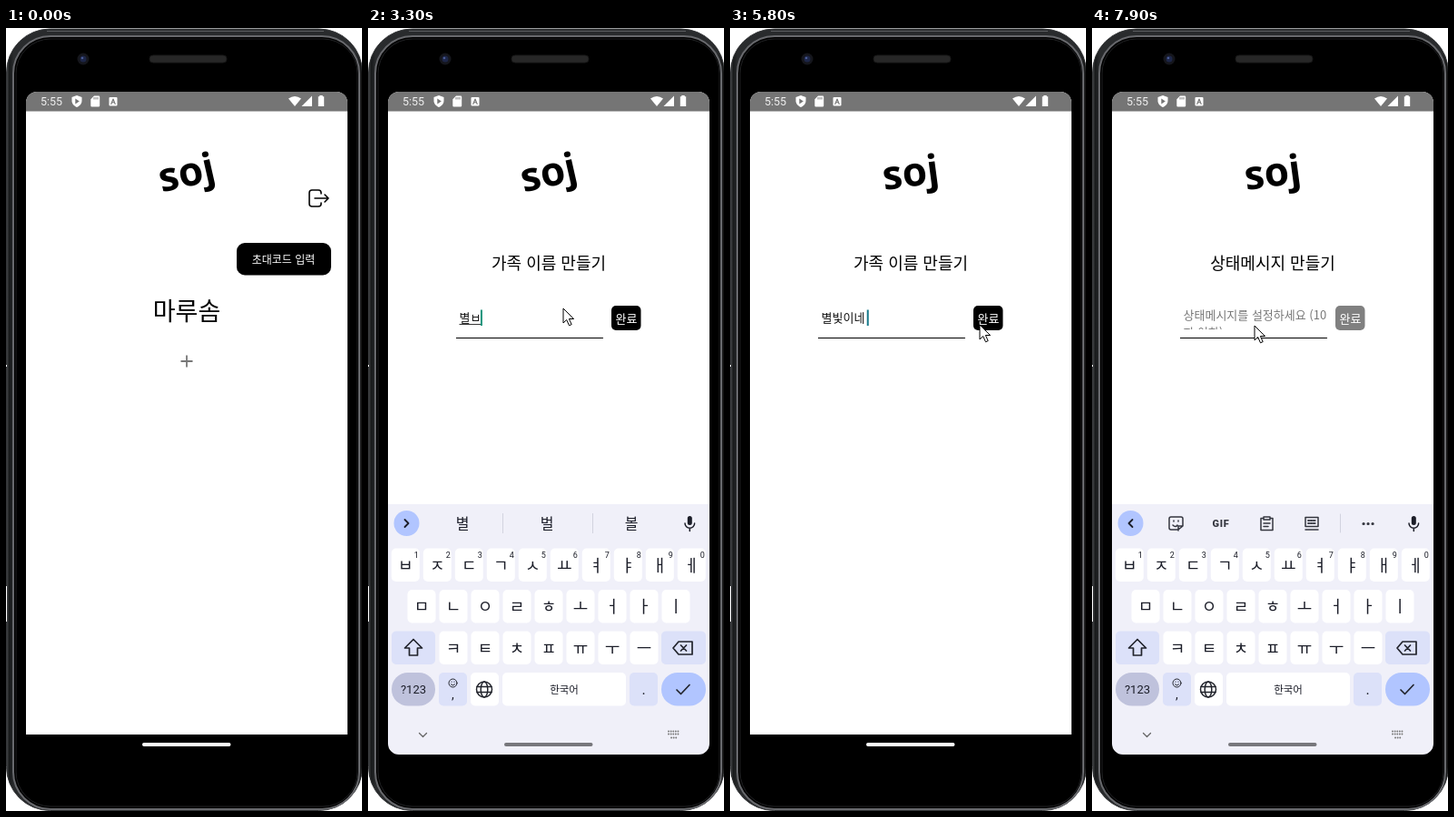
An HTML page that plays this animation: 392 by 860 pixels, repeating every 8000 ms.

```html
<!DOCTYPE html>
<html lang="ko">
<head>
<meta charset="utf-8">
<title>Family setup</title>
<style>
  html, body { margin: 0; width: 100%; height: 100%; overflow: hidden; background: #fff; }
  svg { display: block; width: 100%; height: 100%; }
  text { font-family: "Noto Sans CJK KR", "Noto Sans CJK", "Noto Sans CJK JP", sans-serif; white-space: pre; }
  .mid { text-anchor: middle; }
  .title { font-size: 18px; font-weight: 500; }
  .field { font-size: 13px; font-weight: 350; }
  .latin { font-family: Roboto, sans-serif; }
  .line { fill: none; stroke-linecap: round; stroke-linejoin: round; }
</style>
</head>
<body>
<svg viewBox="0 0 392 860" preserveAspectRatio="none">
  <defs>
    <clipPath id="screenClip"><path d="M22 798V82a12 12 0 0 1 12-12H364a12 12 0 0 1 12 12V786a12 12 0 0 1-12 12H34a12 12 0 0 1-12-12z"/></clipPath>
    <clipPath id="fieldClip"><rect x="97" y="305" width="162" height="26"/></clipPath>
    <linearGradient id="rim">
      <stop offset="0" stop-color="#4a4c4f"/><stop offset=".008" stop-color="#17191a"/>
      <stop offset=".02" stop-color="#292b2d"/><stop offset=".98" stop-color="#292b2d"/><stop offset="1" stop-color="#111"/>
    </linearGradient>
  </defs>

  <!-- phone body -->
  <rect x=".5" y="1" width="392" height="858.5" rx="48" fill="url(#rim)" stroke="#333537"/>
  <rect x="8" y="9" width="381" height="849" rx="41" fill="#000" stroke="#68696d" stroke-width="2"/>
  <rect x="11" y="12" width="376" height="843" rx="38" fill="#000" stroke="#202123"/>
  <path d="M45 3.5H350" stroke="#5b5d60"/>
  <path d="M0 613h1v39h-1zM0 370h1v2h-1z" fill="#fff"/>
  <circle cx="85" cy="34" r="6.5" fill="#15161c"/>
  <circle cx="85" cy="34" r="3.5" fill="#1d2648"/>
  <circle cx="84" cy="33" r="1.3" fill="#4a5a94"/>
  <rect x="158" y="30" width="85" height="8" rx="4" fill="#272727" stroke="#1a1a1a"/>

  <g clip-path="url(#screenClip)">
    <rect x="22" y="70" width="354" height="706" fill="#fff"/>
    <rect x="22" y="70" width="354" height="21.5" fill="#757575"/>
    <g fill="#fff">
      <text class="latin" x="38" y="85.3" font-size="12.5" fill="#f0f0f0">5:55</text>
      <path d="M78 74l5.5 2v4c0 3.500-2.500 5.500-5.500 7c-3-1.500-5.500-3.500-5.500-7v-4z"/>
      <path d="M76.300 77.500v6l4.500-3z" fill="#757575"/>
      <path d="M97 74.500h5a1.200 1.200 0 0 1 1.200 1.200v9.600a1.200 1.200 0 0 1-1.200 1.200h-7.500a1.200 1.200 0 0 1-1.200-1.200v-7z"/>
      <path d="M97 76v2.500m2-2.500v2.500m2-2.500v2.500" stroke="#757575" stroke-width=".9"/>
      <rect x="113.500" y="76" width="9" height="9.500" rx="1"/>
      <path d="M115.800 83.500l2.200-5.500 2.200 5.500m-3.700-1.800h3" stroke="#757575" stroke-width="1.100" class="line"/>
      <path d="M311 77.500q7-5 14 0l-7 8.500z"/>
      <path d="M337 74.500v11.500h-11.500z"/>
      <path d="M345.300 74h3.400v1.300h1.500v10.700h-6.400v-10.700h1.500z"/>
    </g>

    <text id="brand" class="mid" x="199" y="174" font-size="44" font-weight="700" style="font-family:'Noto Sans',sans-serif">soj</text>

    <g id="home">
      <path class="line" stroke="#000" stroke-width="1.600" d="M347 182v-1a3 3 0 0 0-3-3h-7a3 3 0 0 0-3 3v12a3 3 0 0 0 3 3h7a3 3 0 0 0 3-3v-1M340 187h15m-4-4l4 4-4 4"/>
      <rect x="254" y="236" width="104" height="35.500" rx="9"/>
      <text class="mid" x="305.500" y="258.500" font-size="12" fill="#fff">초대코드 입력</text>
      <text class="mid" x="199" y="321" font-size="27" font-weight="500">마루솜</text>
      <path d="M192.500 366h13m-6.500-6.500v13" stroke="#777" stroke-width="1.800"/>
    </g>

    <g id="form">
      <text id="title" class="mid title" x="199" y="265"></text>
      <g clip-path="url(#fieldClip)">
        <text id="entry" class="field" x="100.500" y="323"></text>
        <text id="entryRest" class="field" x="100.500" y="339" fill="#777">자 이하)</text>
      </g>
      <path id="composing" stroke="#222" stroke-width=".9"/>
      <rect id="caret" y="309.500" width="2" height="17.500" fill="#187a8c"/>
      <path d="M97 340.500H259" stroke="#000" stroke-width="1.200"/>
      <rect id="done" x="268" y="305" width="32.500" height="27" rx="5"/>
      <text class="mid" x="284.500" y="324" font-size="13" font-weight="500" fill="#fff">완료</text>
    </g>

    <g id="keyboard">
      <rect x="22" y="523" width="354" height="275" fill="#f0f0f9"/>
      <circle cx="42.500" cy="544" r="14" fill="#b1c5ff"/>
      <path id="chevron" class="line" stroke="#1b1d28" stroke-width="1.800"/>
      <g id="tools" class="line" stroke="#34363f" stroke-width="1.500">
        <path d="M100 547v-8a2 2 0 0 0-2-2h-11a2 2 0 0 0-2 2v10a2 2 0 0 0 2 2h8zM95 552v-5h5M89 546q3 3 5 0M90 541v1m5-1v1"/>
        <text class="latin mid" x="142" y="548" font-size="11" font-weight="900" fill="#34363f" stroke="none" letter-spacing=".8">GIF</text>
        <path d="M189 538.500h-3v13h13v-13h-3M189 537h7v3h-7zM189 544h7m-7 3.500h5"/>
        <path d="M235 537.500h14v10h-14zM238 541h8m-8 3h8M235 551h14" /><path d="M238 541h8m-8 3h8" stroke-dasharray="1 2"/>
        <path d="M273.500 534v20" stroke="#d2d3df" stroke-width="1"/>
        <path d="M299 544.500h.1m4.900 0h.1m4.900 0h.1" stroke-width="3.200"/>
      </g>
      <g id="hints">
        <path d="M148.500 533v22M247.500 533v22" stroke="#d2d3df"/>
      </g>
      <rect x="351.800" y="536" width="5" height="10" rx="2.500" fill="#1b1d28"/>
      <path class="line" stroke="#1b1d28" stroke-width="1.500" d="M349 544a5.300 5.300 0 0 0 10.600 0M354.300 549.500v3"/>
      <g id="keys"></g>
      <g class="line" stroke="#22242c" stroke-width="1.700">
        <path d="M50 671.500l-9.500 9.500h5v8h9v-8h5z"/>
        <path d="M342 674h15v14h-15l-6-7zM344.500 678l6 6m0-6l-6 6"/>
        <g stroke-width="1.500"><circle cx="128" cy="726.500" r="8.500"/><ellipse cx="128" cy="726.500" rx="3.800" ry="8.500"/><path d="M120 723.500h16m-16 6h16"/></g>
        <g stroke-width="1"><circle cx="93.500" cy="719.500" r="4.500"/><path d="M91.500 721q2 2 4 0M92 718v.2m3-.2v.2"/></g>
        <path d="M340 727l4.500 4.500 9.500-10"/>
        <path d="M56.500 774.500l4 4 4-4" stroke="#666" stroke-width="1.300"/>
        <path d="M331 772.500h13m-13 3h13m-10 4h7" stroke="#777" stroke-width="1.800" stroke-dasharray=".1 2.500"/>
      </g>
    </g>
  </g>
  <rect id="pill" x="150" y="785" width="97.500" height="4" rx="2"/>
  <path id="pointer" d="M0 0v16l3.700-3.500 2.800 6.300 2.700-1.200-2.800-6.100h5.200z" fill="#fff" stroke="#000" stroke-width="1"/>
</svg>
<script>
const LOOP = 8000, FORM_AT = 1200, STATUS_AT = 6100;
const FOCUS = [1900, 7100];
const SWING = 800, MAX_TILT = 15;
const LETTER = 11.96;

const $ = id => document.getElementById(id);
const show = (id, on) => $(id).setAttribute('display', on ? 'inline' : 'none');
const set = (id, attrs) => { for (const k in attrs) $(id).setAttribute(k, attrs[k]); };
const clamp = v => Math.min(1, Math.max(0, v));
const smooth = v => v * v * (3 - 2 * v);
const easeOut = v => 1 - (1 - v) ** 2;

const typed = [
  [2800, 'ㅂ'], [2950, '벼'], [3100, '별'], [3250, '별ㅂ'], [3400, '별비'], [3550, '별빛'],
  [3700, '별빛ㅇ'], [3850, '별빛이'], [4000, '별빛인'], [4150, '별빛이네'], [4350, '별빛이네 ']
];

// time, x, y
const route = [
  [400, 310, 340], [700, 197, 364], [1250, 197, 364], [1650, 215, 308],
  [4700, 215, 308], [5200, 320, 332], [5500, 320, 332], [5750, 275, 326],
  [6200, 275, 326], [6600, 179, 327]
];

function buildKeys() {
  const key = (x, y, w, fill, rx = 5) => `<rect x="${x}" y="${y}" width="${w}" height="36.5" rx="${rx}" fill="${fill}"/>`;
  const label = (x, y, size, s, cls = '') => `<text class="mid ${cls}" x="${x}" y="${y}" font-size="${size}" fill="#1b1d28">${s}</text>`;
  let out = '';
  [['ㅂㅈㄷㄱㅅㅛㅕㅑㅐㅔ', 41.3, 571.5], ['ㅁㄴㅇㄹㅎㅗㅓㅏㅣ', 59, 617], ['ㅋㅌㅊㅍㅠㅜㅡ', 94, 662.5]].forEach(([row, x0, y], r) =>
    [...row].forEach((c, i) => {
      const x = x0 + i * 35;
      out += key(x - 15.5, y, 31, '#fff') + label(x, y + 25, 18, c);
      if (!r) out += label(x + 12, y + 10.5, 9, (i + 1) % 10, 'latin');
    }));
  const pale = '#dce1f9';
  out += key(26, 662.5, 48, pale) + key(323, 662.5, 49, pale);
  out += key(26, 708, 48, '#bfc2dc', 18) + label(50, 731, 13, '?123', 'latin');
  out += key(78, 708, 31, pale) + label(93.5, 737, 14, ',', 'latin');
  out += key(113, 708, 31, '#fff') + key(148, 708, 136, '#fff') + label(216, 730.5, 11.5, '한국어');
  out += key(288, 708, 31, pale) + label(303.5, 732, 16, '.', 'latin') + key(323, 708, 49, '#b1c5ff', 18);
  $('keys').innerHTML = out;
  $('hints').innerHTML += [104, 197, 290].map(x => label(x, 550, 16, '', 'hint')).join('');
}

function pointerAt(t) {
  const i = route.findIndex(p => p[0] > t);
  if (i < 0) return route[route.length - 1].slice(1);
  const [t0, x0, y0] = route[i - 1], [t1, x1, y1] = route[i];
  const k = smooth((t - t0) / (t1 - t0));
  return [x0 + (x1 - x0) * k, y0 + (y1 - y0) * k];
}

function keyboardLevel(t) {
  const rise = start => easeOut(clamp((t - start) / 300));
  if (t >= STATUS_AT) return rise(7120);
  return rise(1893) * (1 - smooth(clamp((t - 4450) / 260)));
}

function drawForm(t) {
  const status = t >= STATUS_AT;
  const step = status ? undefined : typed.filter(s => s[0] <= t).pop();
  const value = step ? step[1] : '';
  const composing = !!value && !value.endsWith(' ');
  const letters = value.trimEnd().length;

  $('title').textContent = status ? '상태메시지 만들기' : '가족 이름 만들기';
  $('entry').textContent = value || (status ? '상태메시지를 설정하세요 (10' : '가족 이름을 설정하세요 (8자');
  set('entry', { y: status ? 319.5 : 323, fill: value ? '#111' : '#777' });
  show('entryRest', status);
  set('done', { fill: value ? '#000' : '#808080' });

  const end = 100.5 + letters * LETTER;
  show('composing', composing);
  set('composing', { d: `M100.5 325.500H${end}` });

  const focused = FOCUS[+status];
  const since = t - (step ? step[0] : focused);
  show('caret', t >= focused && Math.floor(since / 500) % 2 === 0);
  set('caret', { x: end + (value.endsWith(' ') ? 2.9 : 0) - .5, fill: composing ? '#18947c' : '#187a8c' });

  show('tools', !value);
  show('hints', composing);
  set('chevron', { d: value ? 'M40.500 540l4 4-4 4' : 'M44.500 540l-4 4 4 4' });
  const words = t < 3500 ? ['별', '벌', '볼'] : ['별빛', '별빛이', '달빛'];
  document.querySelectorAll('.hint').forEach((el, i) => el.textContent = words[i]);
}

function render(t) {
  const onForm = t >= FORM_AT;
  const opened = t >= STATUS_AT ? STATUS_AT : onForm ? FORM_AT : -500;
  const tilt = MAX_TILT * (1 - Math.cos((t - opened) / SWING * 2 * Math.PI)) / 2;
  set('brand', { transform: `rotate(${-tilt} 199 160)` });
  show('home', !onForm);
  show('form', onForm);
  drawForm(t);

  const level = keyboardLevel(t);
  show('keyboard', level > 0);
  set('keyboard', { transform: `translate(0 ${275 * (1 - level)})`, opacity: level });
  set('pill', { fill: level > .95 ? '#77777c' : '#fff' });

  const visible = t >= route[0][0];
  show('pointer', visible);
  if (visible) set('pointer', { transform: `translate(${pointerAt(t)})` });
}

buildKeys();
const start = performance.now();
(function tick() {
  render((performance.now() - start) % LOOP);
  requestAnimationFrame(tick);
})();
</script>
</body>
</html>
```
